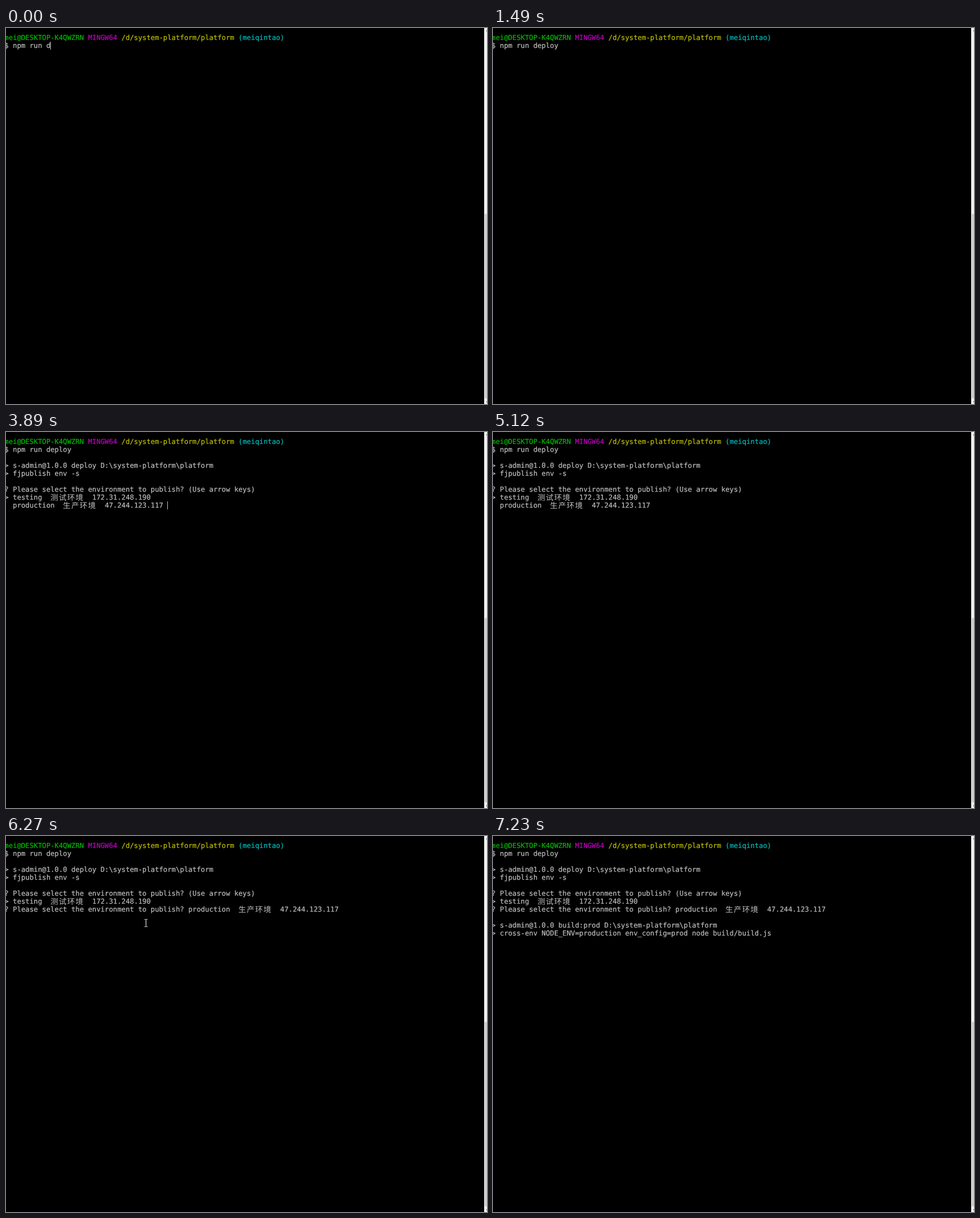
An HTML page for the animation above (8000 ms loop, 847x661 px).

```html
<!DOCTYPE html>
<html lang="zh-CN">
<head>
<meta charset="utf-8">
<style>
  html, body { margin: 0; width: 100%; height: 100%; overflow: hidden; background: #000; }
  svg { display: block; }
  text {
    font: 12.225px "DejaVu Sans Mono", monospace;
    color: #bfbfbf; white-space: pre; text-rendering: geometricPrecision;
  }
  text, tspan { fill: currentColor; stroke: currentColor; stroke-width: .2px; }
  .user { color: #00bf00; }
  .system { color: #bf00bf; }
  .path { color: #bfbf00; }
  .branch { color: #00bfbf; }
  .cjk {
    font: 13.5px "Noto Sans CJK SC", "Noto Sans CJK", sans-serif;
    letter-spacing: calc(14.72px - 1em); baseline-shift: -1px; stroke: none;
  }
</style>
</head>
<body>
<svg width="847" height="661" viewBox="0 0 847 661">
  <rect width="847" height="661"/>
  <g id="lines"></g>
  <rect id="caret" width="1" height="14" fill="#bfbfbf"/>
  <path id="pointer" d="M0 .5h2M3 .5h2M2.5 1v12M0 13.5h2M3 13.5h2" stroke="#fff" fill="none"/>
  <rect x="842" width="5" height="661" fill="#f0f0f0"/>
  <rect x="843" y="327" width="4" height="324" fill="#cdcdcd"/>
  <path d="M846 4h1v2h-1zM846 656h1v2h-1z" fill="#606060"/>
</svg>
<script>
const LOOP = 8000, CELL = 7.36, LEFT = -2.7, ROW = 14, TOP = 10;
const $ = id => document.getElementById(id);
const span = (name, text) => `<tspan class="${name}">${text}</tspan>`;
const show = (el, on) => el.setAttribute('visibility', on ? 'visible' : 'hidden');

const question = '? Please select the environment to publish? ';
const production = `production  ${span('cjk', '生产环境')}  47.244.123.117`;

// row, start, end, markup
const lines = [
  [0, 0, LOOP, span('user', 'mei@DESKTOP-K4QWZRN') + ' ' + span('system', 'MINGW64') + ' ' +
    span('path', '/d/system-platform/platform') + ' ' + span('branch', '(meiqintao)')],
  [1, 0, LOOP, ''],
  [3, 2670, LOOP, '&gt; s-admin@1.0.0 deploy D:\\system-platform\\platform'],
  [4, 2670, LOOP, '&gt; fjpublish env -s'],
  [6, 3890, LOOP, question + '(Use arrow keys)'],
  [7, 3890, LOOP, `&gt; testing  ${span('cjk', '测试环境')}  172.31.248.190`],
  [8, 3890, 5280, '  ' + production],
  [8, 5280, LOOP, question + production],
  [10, 6540, LOOP, '&gt; s-admin@1.0.0 build:prod D:\\system-platform\\platform'],
  [11, 6540, LOOP, '&gt; cross-env NODE_ENV=production env_config=prod node build/build.js']
];
$('lines').innerHTML = lines.map(([row, , , markup]) =>
  `<text x="${LEFT}" y="${TOP + 11 + row * ROW}">${markup}</text>`).join('');
const texts = [...$('lines').children];

const keyTimes = [120, 670, 790, 950, 1090];
const caretSpans = [[0, 550], [670, 1490], [3890, 4290], [4570, 5120]];
// time, x, y
const pointerStops = [
  [6270, 244, 146], [6420, 282, 192], [6540, 360, 298], [6660, 467, 417],
  [6820, 643, 505], [6960, 716, 592], [7080, 748, 636]
];

function render(t) {
  lines.forEach(([, start, end], i) => show(texts[i], t >= start && t < end));

  const typed = keyTimes.filter(k => t >= k).length;
  const command = '$ npm run ' + 'deploy'.slice(0, typed + 1);
  if (texts[1].textContent !== command) texts[1].textContent = command;

  const column = t < 2670 ? command.length : 39;
  const row = t < 2670 ? 1 : t < 4720 ? 8 : 9;
  $('caret').setAttribute('x', Math.round(LEFT + column * CELL));
  $('caret').setAttribute('y', TOP + row * ROW);
  show($('caret'), caretSpans.some(([start, end]) => t >= start && t < end));

  const stop = pointerStops.filter(([time]) => t >= time).pop();
  show($('pointer'), stop && t < 7230);
  if (stop) $('pointer').setAttribute('transform', `translate(${stop[1]} ${stop[2]})`);
}

const begin = performance.now();
function tick() {
  render((performance.now() - begin) % LOOP);
  requestAnimationFrame(tick);
}
tick();
</script>
</body>
</html>
```
